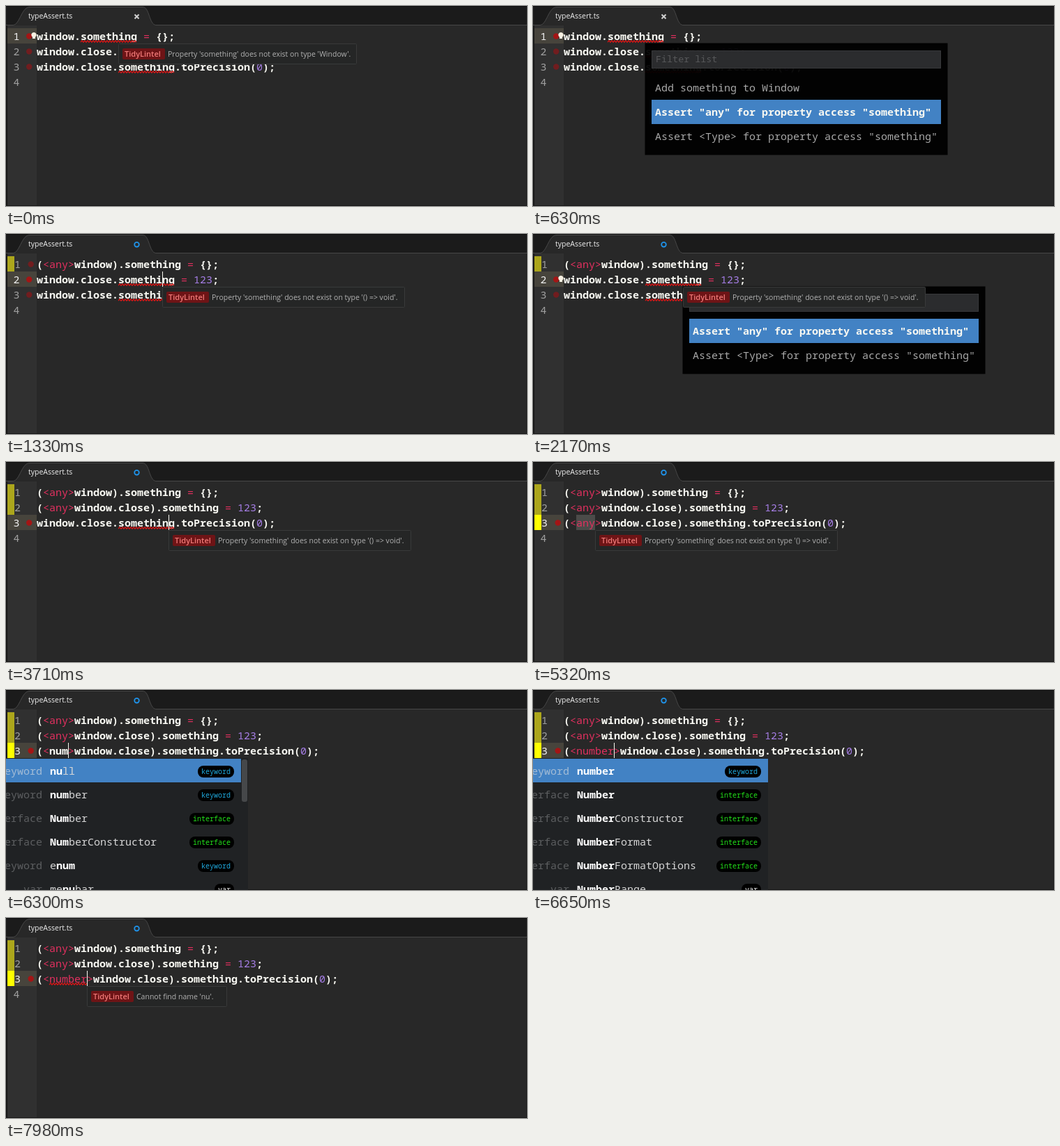
Recreate the animation shown at these times as an HTML page. Size 747 by 288 pixels, loop 8.33 s.

```html
<!DOCTYPE html>
<html lang="en">
<head>
<meta charset="utf-8">
<title>Type assertion quick fixes</title>
<style>
html, body { margin: 0; width: 100%; height: 100%; overflow: hidden; background: #282828; }
svg { display: block; width: 747px; height: 288px; }
text { white-space: pre; }
.code { font: 600 15px "Noto Sans Mono", monospace; fill: #f8f8f2; }
.code .op { font-weight: 500; fill: #e2305f; }
.code .num { font-weight: 500; fill: #a67ee6; }
.mono { font: 400 15px "Noto Sans Mono", monospace; }
.mono .hit { font-weight: 700; fill: #fff; }
.hint { font: 400 13.4px "Noto Sans Mono", monospace; fill: #57585a; }
.pill { font: 400 10px "Noto Sans Mono", monospace; }
.ui { font: 400 10.5px "Open Sans", sans-serif; }
.tag { font: 600 11px "Open Sans", sans-serif; fill: #f07a78; }
</style>
</head>
<body>
<svg id="stage" viewBox="0 0 747 288"></svg>
<script>
const LOOP = 8330, TICK = 70;
const LEFT = 44, TOP = 32, CHAR = 9, ROW = 22;
const BLUE = '#4282c4';

const WINDOW_ERR = ["Property 'something' does not exist on type 'Window'.", 341];
const VOID_ERR = ["Property 'something' does not exist on type '() => void'.", 347];
const NAME_ERR = ["Cannot find name 'nu'.", 200];

const ASSERTS = ['Assert "any" for property access "something"',
                 'Assert <Type> for property access "something"'];
const ALL_FIXES = ['Add something to Window', ...ASSERTS];

const WORDS = [
  ['null', 'keyword'], ['number', 'keyword'], ['Number', 'interface'],
  ['NumberConstructor', 'interface'], ['enum', 'keyword'], ['menubar', 'var'],
  ['NumberFormat', 'interface'], ['NumberFormatOptions', 'interface'], ['NumberRange', 'var']
];
const KIND_COLOR = { keyword: '#1fa8dc', interface: '#22e01a', var: '#f0f0f0' };

const START = {
  cast: [null, null, null],      // inserted type per line
  row: 0, col: 13, caret: false,
  dots: [true, true, true], bulb: 0, bars: 0, dirty: false,
  tip: [0, 13, WINDOW_ERR], menu: null, list: '', select: false, wrong: false
};

const menu = (row, col, items, sel, alpha, caret) => ({ row, col, items, sel, alpha, caret });
const first = (sel, alpha, caret) => ({ menu: menu(0, 13, ALL_FIXES, sel, alpha, caret) });
const second = alpha => ({ menu: menu(1, 19, ASSERTS, 0, alpha, false) });
const third = (sel, alpha, caret) => ({ menu: menu(2, 21, ASSERTS, sel, alpha, caret) });
const move = (row, col) => ({ row, col, caret: true, tip: [row, col, VOID_ERR] });
const type = word => ({ cast: ['any', 'any', word], col: 2 + word.length, caret: true });

// [time, changes to the state]
const STEPS = [
  [70, first(0, .4, false)],
  [140, { ...first(0, .8, true), tip: null }],
  [210, first(0, 1, true)],
  [560, first(1, 1, true)],
  [630, first(1, 1, false)],
  [840, { cast: ['any', null, null], menu: null, col: 20, caret: true }],
  [1120, { bars: 1, dirty: true }],
  [1260, { row: 1, bulb: -1 }],
  [1330, move(1, 20)],
  [1680, move(1, 19)],
  [1750, { dots: [false, true, true] }],
  [1820, { bulb: 1 }],
  [1960, { ...second(.3), caret: false }],
  [2030, second(.6)],
  [2100, second(.85)],
  [2170, second(1)],
  [2520, { cast: ['any', 'any', null], menu: null, tip: null, col: 26, caret: true }],
  [2800, { bars: 2 }],
  [2940, { ...move(2, 26), bulb: -1 }],
  [3010, move(2, 25)],
  [3430, move(2, 24)],
  [3500, move(2, 23)],
  [3570, move(2, 22)],
  [3640, move(2, 21)],
  [3710, { dots: [false, false, true] }],
  [3990, { bulb: 2 }],
  [4060, { ...third(0, .35, false), caret: false }],
  [4130, third(0, .7, true)],
  [4200, { ...third(0, 1, true), tip: null }],
  [4480, third(1, 1, true)],
  [4760, third(1, 1, false)],
  [4970, { cast: ['any', 'any', 'any'], menu: null, bulb: -1, col: 5, select: true }],
  [5040, { tip: [2, 5, VOID_ERR] }],
  [5320, { bars: 3 }],
  [5950, { ...type('n'), tip: null, select: false }],
  [6090, type('nu')],
  [6160, { list: 'nu' }],
  [6300, type('num')],
  [6370, { list: 'num' }],
  [6440, type('numb')],
  [6510, type('numbe')],
  [6580, type('number')],
  [6650, { list: 'number' }],
  [7070, { caret: false }],
  [7210, { list: '', caret: true, wrong: true, tip: [2, 8, NAME_ERR] }],
  [7630, { caret: false }],
  [7980, { caret: true }]
];

const stateAt = t => Object.assign({}, START, ...STEPS.filter(s => s[0] <= t).map(s => s[1]));

const esc = s => s.replace(/&/g, '&amp;').replace(/</g, '&lt;').replace(/>/g, '&gt;');
const rect = (x, y, w, h, fill, more = '') =>
  `<rect x="${x}" y="${y}" width="${w}" height="${h}" fill="${fill}" ${more}/>`;
const text = (x, y, cls, s, more = '') => `<text x="${x}" y="${y}" class="${cls}" ${more}>${s}</text>`;
const span = (cls, s) => `<tspan class="${cls}">${s}</tspan>`;
const colX = col => LEFT + col * CHAR;
const rowY = row => TOP + row * ROW;

const BASES = ['window', 'window.close', 'window.close'];
const TAILS = ['.something = {};', '.something = 123;', '.something.toPrecision(0);'];

function paint(line) {
  return line.split(/(<any>|<number>|[<>=]|\d+)/).map((part, i) =>
    i % 2 ? span(/\d/.test(part) ? 'num' : 'op', esc(part)) : esc(part)).join('');
}

function wave(row, col, count) {
  const pts = [];
  for (let i = 0; i <= count * CHAR / 2; i++)
    pts.push(`${colX(col) + 2 * i},${rowY(row) + 19 + (i % 2 ? -1.2 : 1.2)}`);
  return `<polyline points="${pts.join(' ')}" fill="none" stroke="#dc1414" stroke-width="1.2"/>`;
}

function chrome(s) {
  const close = s.dirty
    ? '<circle cx="187.5" cy="15.2" r="3.3" fill="none" stroke="#1f93ea" stroke-width="1.8"/>'
    : '<path d="M184.5 12.2l6 6m0-6l-6 6" stroke="#d0d0d0" stroke-width="2"/>';
  return rect(0, 0, 747, 288, '#282828') + rect(0, 0, 747, 28, '#1b1b1b') +
    rect(0, 0, 747, 1, '#0c0c0c') +
    '<path d="M0 28.5V27.5H10C20 27 22 1.5 34 1.5H196C206 1.5 205 27 215 27.5H747V28.5Z" fill="#282828"/>' +
    '<path d="M0 27.5H10C20 27 22 1.5 34 1.5H196C206 1.5 205 27 215 27.5H747" fill="none" stroke="#484848"/>' +
    text(32, 18, 'ui', 'typeAssert.ts', 'fill="#f0f0f0"') + close +
    rect(2, 28, 42, 260, '#303030') + rect(0, 28, 2, 260, '#161616') +
    rect(746, 28, 1, 260, '#1a1a1a') + rect(0, 287, 747, 1, '#161616');
}

function gutter(s) {
  let out = rect(2, rowY(s.row), 42, ROW, '#47443c');
  for (let i = 0; i < 4; i++) {
    const y = rowY(i), here = i === s.row, barred = i < s.bars;
    if (barred) out += rect(2, y, 10, ROW, here ? '#ffff00' : '#aca61c');
    out += text(barred ? 12 : 10.5, y + 17, 'mono', i + 1, `fill="${here ? '#f0f0f0' : '#a0a0a0'}"`);
    if (s.dots[i])
      out += `<circle cx="${barred ? 35.7 : 33.2}" cy="${y + 11.5}" r="4.2" fill="${here ? '#a31515' : '#711d1f'}"/>`;
    if (s.bulb === i)
      out += `<path d="M38 ${y + 15}v-2.3a3.7 3.7 0 1 1 4 0v2.3z" fill="#f6f0e2"/>`;
  }
  return out;
}

function code(s) {
  let out = s.select ? rect(colX(2), rowY(2), 27, ROW, '#4b4b49') : '';
  BASES.forEach((base, i) => {
    const cast = s.cast[i];
    const head = cast ? `(<${cast}>${base})` : base;
    out += text(LEFT, rowY(i) + 17, 'code', paint(head + TAILS[i]));
    if (!cast) out += wave(i, base.length + 1, 9);
  });
  if (s.wrong) out += wave(2, 2, 6);
  if (s.caret) out += rect(colX(s.col), rowY(s.row), 1, ROW, '#f8f8f0');
  return out;
}

function tooltip([row, col, [msg, width]]) {
  const x = colX(col), y = rowY(row + 1);
  return rect(x + .5, y + .5, width, 29, '#252626', 'stroke="#393a3a" rx="1"') +
    rect(x + 6, y + 7, 61, 16, '#6e1416', 'rx="2"') +
    text(x + 9, y + 19, 'tag', 'TidyLintel') +
    text(x + 71, y + 19, 'ui', esc(msg), 'fill="#b2b2b2"');
}

function fixMenu({ row, col, items, sel, alpha, caret }) {
  const x = colX(col), y = rowY(row + 1);
  let out = rect(x, y, 433, 55 + 35 * items.length, '#000', 'fill-opacity=".95"') +
    rect(x, y, 433, 55 + 35 * items.length, 'none', 'stroke="#000"') +
    rect(x + 9.5, y + 10.5, 414, 25, '#2b2c2e', 'stroke="#37383a"') +
    text(x + 15, y + 27, 'hint', 'Filter list');
  if (caret) out += rect(x + 15, y + 10, 1, 25, '#d8d8d8');
  items.forEach((item, i) => {
    const top = y + 46 + 35 * i;
    if (i === sel) out += rect(x + 9, top - 0, 415, 35, BLUE);
    out += text(x + 14, top + 23, i === sel ? 'code' : 'mono', esc(item), i === sel ? '' : 'fill="#a8a8a8"');
  });
  return `<g opacity="${alpha}">${out}</g>`;
}

function suggestions(query) {
  const rows = WORDS.filter(([word]) => word.toLowerCase().includes(query));
  const scroll = rows.length > 6;
  const hit = query === 'nu' ? /num?/i : new RegExp(query, 'i');
  let out = rect(0, 98, scroll ? 347 : 337, 190, '#202224');
  if (scroll) out += rect(338, 100, 8, 61, '#46484a', 'rx="3"');
  rows.slice(0, 6).forEach(([word, kind], i) => {
    const y = 99 + 34 * i, w = kind.length * 6 + 10;
    if (!i) out += rect(0, y, 337, 34, BLUE);
    out += text(52, y + 23, 'mono', kind, `text-anchor="end" fill="${i ? '#5c5e60' : '#a3bcd6'}"`) +
      text(63, y + 23, 'mono', word.replace(hit, m => span('hit', m)), 'fill="#d6d6d6"') +
      rect(327 - w, y + 10, w, 17, '#000', 'rx="8"') +
      text(332 - w, y + 22, 'pill', kind, `fill="${KIND_COLOR[kind]}"`);
  });
  return out;
}

const stage = document.getElementById('stage');
let shown = -1;

function draw(t) {
  const s = stateAt(t);
  stage.innerHTML = chrome(s) + gutter(s) + code(s) +
    (s.menu ? fixMenu(s.menu) : '') +
    (s.list ? suggestions(s.list) : '') +
    (s.tip ? tooltip(s.tip) : '');
}

const began = performance.now();
function frame() {
  const t = Math.floor((performance.now() - began) % LOOP / TICK) * TICK;
  if (t !== shown) draw(shown = t);
  requestAnimationFrame(frame);
}
frame();
</script>
</body>
</html>
```
